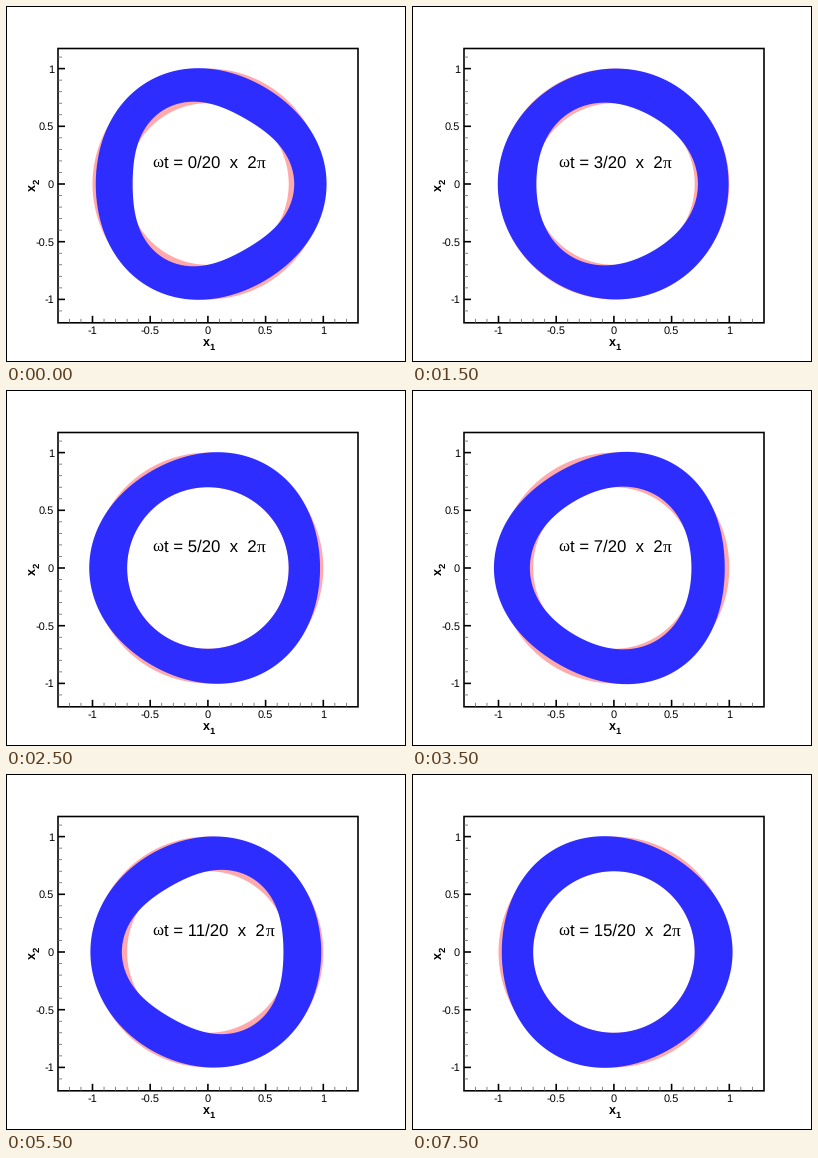
A matplotlib script that plays this animation: 400x356 px, repeating every 8000 ms.

```python
import numpy as np
import matplotlib.pyplot as plt
from matplotlib.animation import FuncAnimation
from matplotlib.patches import PathPatch, Rectangle
from matplotlib.path import Path

W, H, DPI = 400, 356, 100
CX, CY, UNIT = 201.9, 178, 115.4
LEFT, RIGHT, TOP, BOTTOM = 52, 352, 42.5, 316.8
STEPS, SHOWN = 20, 16
BLUE, PINK = "#2d2dff", "#ffaaaa"
THETA = np.linspace(0, 2 * np.pi, 361)

plt.rcParams["text.hinting"] = "none"


def pt(px):
    return px * 72 / DPI


# The black figure shows through as a one-pixel border.
fig = plt.figure(figsize=(W / DPI, H / DPI), dpi=DPI, facecolor="black")
ax = fig.add_axes([0, 0, 1, 1])
ax.set_xlim(0, W)
ax.set_ylim(H, 0)
ax.axis("off")
ax.add_patch(Rectangle((1, 1), W - 2, H - 2, fc="white", ec="none"))


def label(x, y, s, size=11, font="Liberation Sans", **kw):
    return ax.text(x, y, s, fontsize=pt(size), family=font, color="black",
                   va="baseline", **kw)


def line(xs, ys, width, color="black"):
    ax.plot(xs, ys, color=color, lw=pt(width), solid_capstyle="butt",
            snap=False)


def outline(r):
    xy = np.column_stack([CX + UNIT * r * np.cos(THETA),
                          CY - UNIT * r * np.sin(THETA)])
    return Path(xy, closed=True)


def ring(inner_amp, outer_amp):
    """Annulus whose walls carry a three-lobed radial wave."""
    wave = np.cos(3 * THETA)
    outer = outline(1 + outer_amp * wave)
    inner = outline(0.7 + inner_amp * wave)
    hole = Path(inner.vertices[::-1], closed=True)
    return Path.make_compound_path(outer, hole)


def draw_axes():
    for k in range(-13, 14):
        v = k / 10
        x, y = CX + UNIT * v, CY - UNIT * v
        major = k % 5 == 0
        size, width, color = (7, 1.6, "black") if major else (4, 0.8, "#666666")
        if LEFT + 1 < x < RIGHT - 1:
            line([x, x], [BOTTOM, BOTTOM - size], width, color)
        if TOP + 1 < y < BOTTOM - 1:
            line([LEFT, LEFT + size], [y, y], width, color)
        if major:
            label(x, 328, f"{v:g}", ha="center")
            label(48, y + 4, f"{v:g}", ha="right")
    ax.add_patch(Rectangle((LEFT, TOP), RIGHT - LEFT, BOTTOM - TOP, fill=False,
                           ec="black", lw=pt(1.6), joinstyle="miter",
                           snap=False))
    label(196.5, 340, "x", 12.5, weight="bold")
    label(203, 344.5, "1", 9.5, weight="bold")
    side = dict(weight="bold", rotation=90, rotation_mode="anchor")
    label(30, 185, "x", 12.5, **side)
    label(33.5, 178.5, "2", 9.5, **side)


draw_axes()
ax.add_patch(PathPatch(ring(0, 0), fc=PINK, ec="none"))
body = PathPatch(ring(0, 0), fc=BLUE, ec="none")
ax.add_patch(body)

SIZE = 16.7
PI_X = 250.3
label(146.7, 162, "ω", SIZE, "Liberation Serif")
phase_text = label(158.2, 162, "", SIZE)
pi_text = label(PI_X, 162, "π", 17.5, "Liberation Serif")


def update(n):
    phase = 2 * np.pi * n / STEPS
    body.set_path(ring(0.048 * np.cos(phase), 0.04 * np.cos(phase + np.pi / 4)))
    phase_text.set_text(f"t = {n}/{STEPS}  x  2")
    pi_text.set_x(PI_X + 0.556 * SIZE * (n > 9))
    return body, phase_text, pi_text


anim = FuncAnimation(fig, update, frames=SHOWN, interval=500,
                     repeat=True, repeat_delay=0, blit=False)
plt.show()
```
